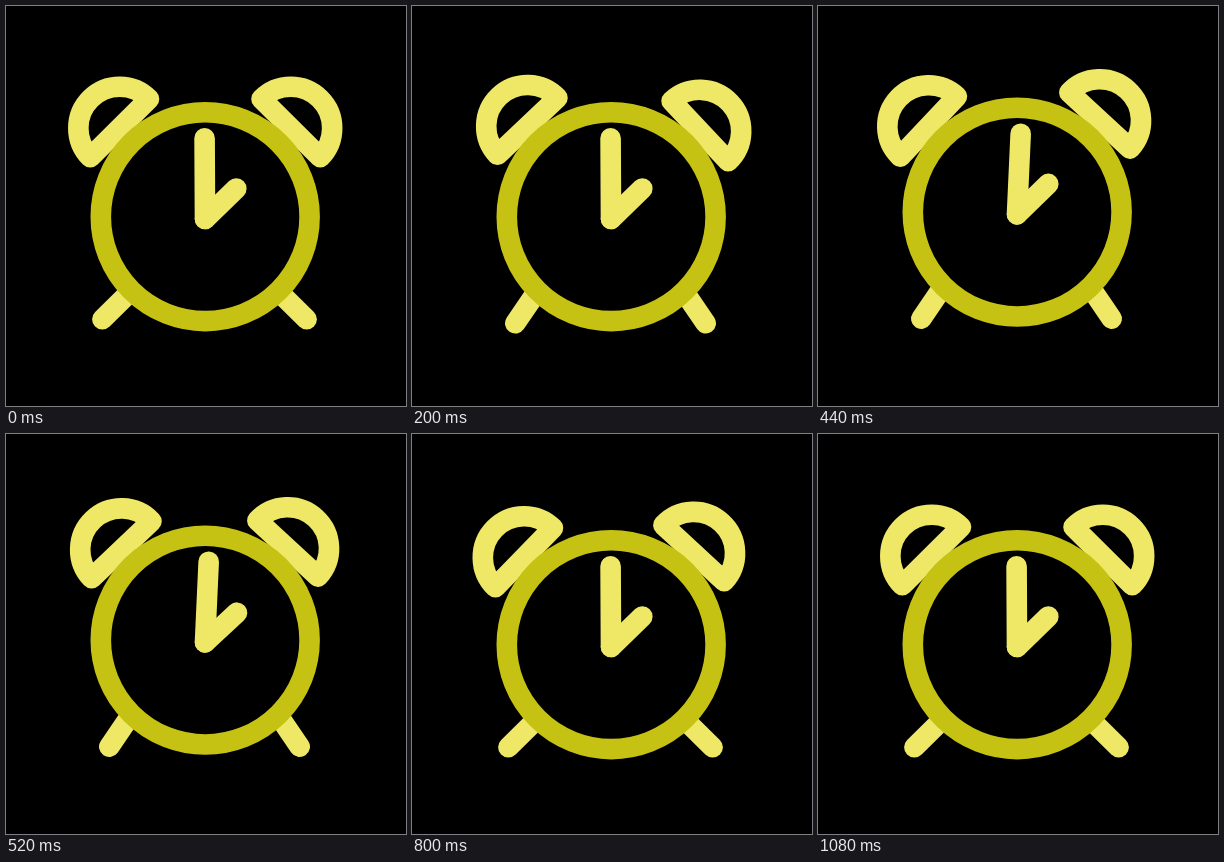
These frames come from a looping animation (400x400 px, 1160 ms). An HTML page:

```html
<!DOCTYPE html>
<html lang="en">
<head>
<meta charset="utf-8">
<title>Alarm clock</title>
<style>
html, body { margin: 0; height: 100%; overflow: hidden; background: #000; }
svg { display: block; width: 100%; height: 100%; }
</style>
</head>
<body>
<svg viewBox="0 0 400 400" fill="none" stroke="#eee866" stroke-width="20.6" stroke-linecap="round" stroke-linejoin="round">
  <g id="clock">
    <path id="leftLeg"/>
    <path id="rightLeg"/>
    <path id="leftBell" d="M84.3 151.2A41 41 0 0 1 143 93Z"/>
    <path id="rightBell" d="M314.2 151.2A41 41 0 0 0 255.5 93Z"/>
    <circle cx="199.2" cy="210.7" r="104.4" stroke="#c6c213"/>
    <path id="minute" d="M199 213L198.6 132.2"/>
    <path id="hour" d="M199 213L230.3 182.5"/>
  </g>
</svg>
<script>
const STEP = 40, LOOP = 1160, REST = 27;
const part = id => document.getElementById(id);

// Leg poses: foot x, y, then the end hidden by the rim
const legs = {
  A: [96.4, 313.3, 123, 287],
  B: [103.3, 317.3, 123, 288.4],
  C: [94.2, 301.8, 119, 287.6]
};
const leftLegPoses = "ABCBABAC", rightLegPoses = "ABCBABCB";
const leftBellTurns = [0, 0, 2, -2, -1, 1.2, -2, 0];
const minuteTurns = [0, 2.9, -0.9, 2.9, -0.9];

const turn = (id, angle, x, y) =>
  part(id).setAttribute("transform", `rotate(${angle} ${x} ${y})`);

function setLeg(id, pose, mirrored) {
  const [x1, y1, x2, y2] = legs[pose];
  const flip = x => mirrored ? 397 - x : x;
  part(id).setAttribute("d", `M${flip(x1)} ${y1}L${flip(x2)} ${y2}`);
}

function draw(time) {
  let n = Math.floor(time % LOOP / STEP);
  if (n >= REST) n = 0;
  const beat = n % 5, swing = n % 7, phase = n % 8;

  part("clock").setAttribute("transform", `translate(0 ${beat % 2 ? -4.6 : 0})`);
  turn("leftBell", leftBellTurns[phase], 199.2, 210.7);
  turn("rightBell", swing === 0 ? 0 : swing % 2 ? 2 : -2, 199.2, 210.7);
  turn("minute", minuteTurns[beat], 199, 213);
  turn("hour", n % 6 === 1 ? 1.4 : 0, 199, 213);
  setLeg("leftLeg", leftLegPoses[phase], false);
  setLeg("rightLeg", rightLegPoses[phase], true);
}

const start = performance.now();
function tick() {
  draw(performance.now() - start);
  requestAnimationFrame(tick);
}
tick();
</script>
</body>
</html>
```
